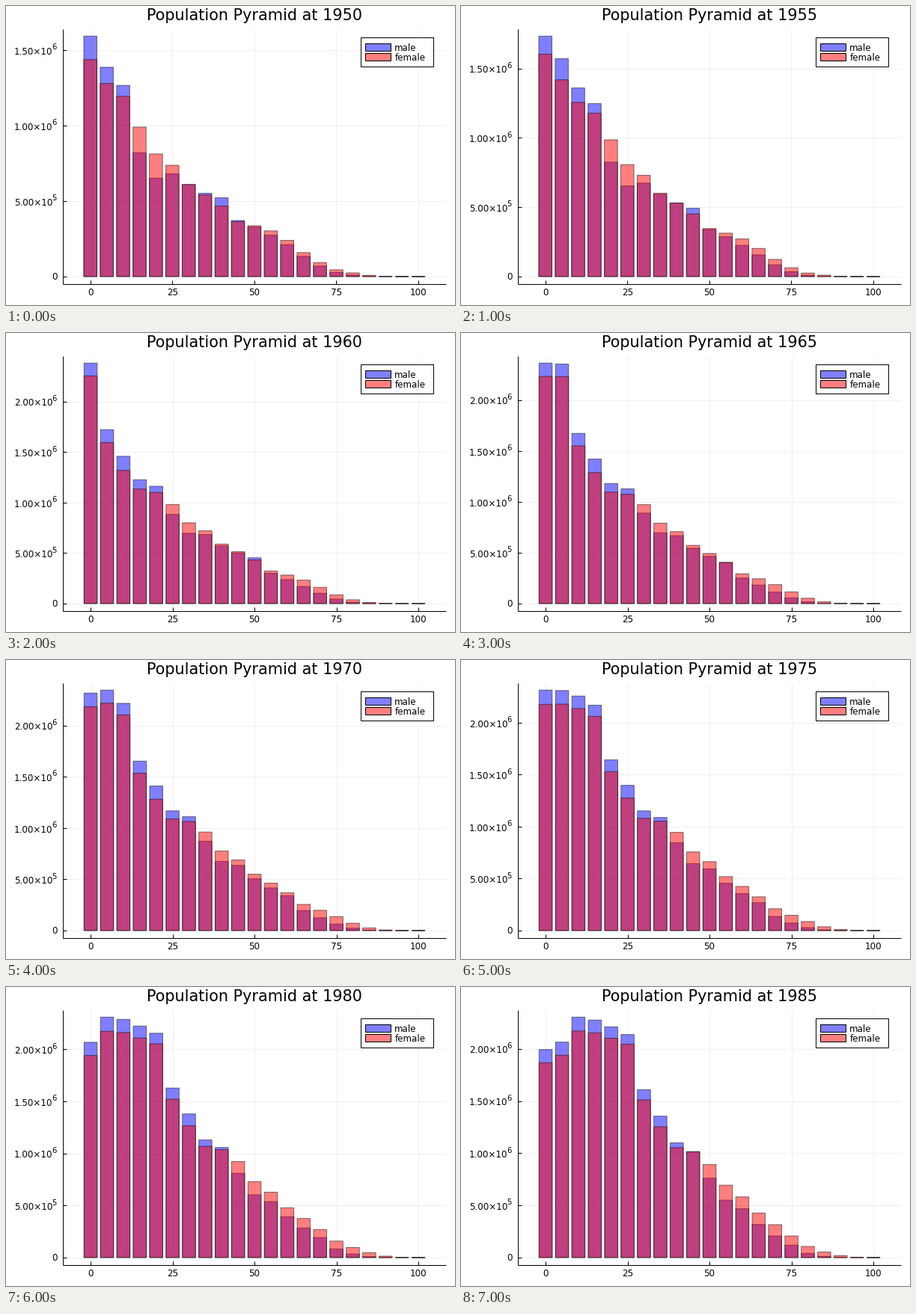
A matplotlib script for the animation above (8000 ms loop, 600 by 400 pixels).

```python
import numpy as np
import matplotlib.pyplot as plt
from matplotlib.animation import FuncAnimation
from matplotlib.patches import Rectangle

PT = 0.72                      # points per pixel at 100 dpi
TOP, BOTTOM, RIGHT = 30.6, 371.6, 588
SMALL, LARGE, SUP = 11.94, 20.8, 10
DIGIT = 0.636                  # digit advance in em
BLUE, RED = (0, 0, 1, 0.5), (1, 0, 0, 0.5)
GRID = (0, 0, 0, 0.06)
AGES = np.arange(0, 101, 5)

# Key points by year of birth, joined by straight lines.
SIZE = {1870: 420, 1875: 320, 1890: 434, 1905: 458, 1910: 600, 1915: 605,
        1920: 648, 1925: 750, 1930: 752, 1935: 937, 1940: 1165, 1945: 1205,
        1950: 1440, 1955: 1675, 1960: 2195, 1965: 2250, 1970: 2302,
        1975: 2322, 1980: 2075, 1985: 2000}
SEX_RATIO = {1870: 0.45, 1890: 0.82, 1895: 0.89, 1905: 0.89, 1910: 0.84,
             1915: 0.94, 1925: 1.005, 1930: 1.096, 1935: 1.067, 1940: 0.938,
             1950: 0.90, 1960: 0.945, 1985: 0.935}
EARLY = {1920: 0, 1930: -0.11, 1935: -0.11, 1940: 0.10, 1945: 0.16,
         1950: 0.112, 1955: 0.04, 1960: 0.09, 1965: 0.055, 1970: 0.01,
         1975: 0}


def along(points, x):
    return np.interp(x, list(points), list(points.values()))


def population(year, female):
    """Thousands per age group: cohort size, early drift, then mortality."""
    born = year - AGES
    size, drift = along(SIZE, born), along(EARLY, born)
    hazard = 0.6 * np.exp(-0.012 * (born - 1905))
    if female:
        size = size * along(SEX_RATIO, born)
        drift = np.maximum(drift, 0)
        hazard = hazard * 0.55
    elapsed = year - np.maximum(born, 1950)
    fade = 1 / (1 + np.exp((elapsed - 8) / 1.5))
    survival = np.exp(-hazard * np.exp(0.07 * (AGES - 60)))
    return size * (1 + drift * fade) * survival


plt.rcParams["font.family"] = "DejaVu Sans"
fig = plt.figure(figsize=(6, 4), dpi=100, facecolor="white")
ax = fig.add_axes([0, 0, 1, 1])


def line(x0, y0, x1, y1, color="black", z=3):
    ax.plot([x0, x1], [y0, y1], color=color, lw=PT, zorder=z,
            solid_capstyle="butt")


def text(x, y, s, size=SMALL):
    ax.text(x, y, s, fontsize=size * PT, ha="left", va="baseline", zorder=6)


def box(x, y, w, h, fill, edge="black", z=2, snap=None):
    ax.add_patch(Rectangle((x, y), w, h, facecolor=fill, edgecolor=edge,
                           linewidth=PT, zorder=z, snap=snap))


def legend():
    box(474, 42, 97, 39, "white", z=4)
    for y, color, name in ((50, BLUE, "male"), (63, RED, "female")):
        box(480, y, 34, 10, color, z=5)
        text(519.3, y + 10, name)


def draw(i):
    year = 1950 + 5 * i
    groups = [population(year, female) for female in (False, True)]
    peak = max(g.max() for g in groups)

    left = 75.8 if year < 1960 else 76.2
    xs = (RIGHT - left) / 116.85
    x0 = left + 8.425 * xs
    unit = (BOTTOM - TOP) / 1.06
    y0 = BOTTOM - 0.03 * unit
    ys = unit / peak

    ax.clear()
    ax.axis("off")
    ax.set_xlim(0, 600)
    ax.set_ylim(400, 0)

    for age in range(0, 101, 25):
        x = x0 + age * xs
        line(x, TOP, x, BOTTOM, GRID, 1)
        line(x, BOTTOM, x, BOTTOM - 5)
        label = str(age)
        text(x - len(label) * DIGIT * SMALL / 2, 387, label)

    for value in np.arange(0, 1.03 * peak, 500):
        y = y0 - value * ys
        line(left, y, RIGHT, y, GRID, 1)
        line(left, y, left + 5, y)
        if value == 0:
            text(61.1, y + 4.3, "0")
            continue
        power = 6 if value >= 1000 else 5
        text(10.9, y + 5.8, f"{value * 1000 / 10 ** power:.2f}×10")
        text(61.4, y - 0.7, str(power), SUP)

    line(left, TOP, left, BOTTOM)
    line(left, BOTTOM, RIGHT, BOTTOM)

    for group, color in zip(groups, (BLUE, RED)):
        for age, count in zip(AGES, group):
            box(x0 + (age - 2) * xs, y0 - count * ys, 4 * xs, count * ys,
                color, (0, 0, 0, 0.5), snap=False)

    legend()
    text(188, 19, f"Population Pyramid at {year}", LARGE)
    return []


anim = FuncAnimation(fig, draw, frames=8, interval=1000, init_func=lambda: [],
                     repeat=True, repeat_delay=0)
plt.show()
```
